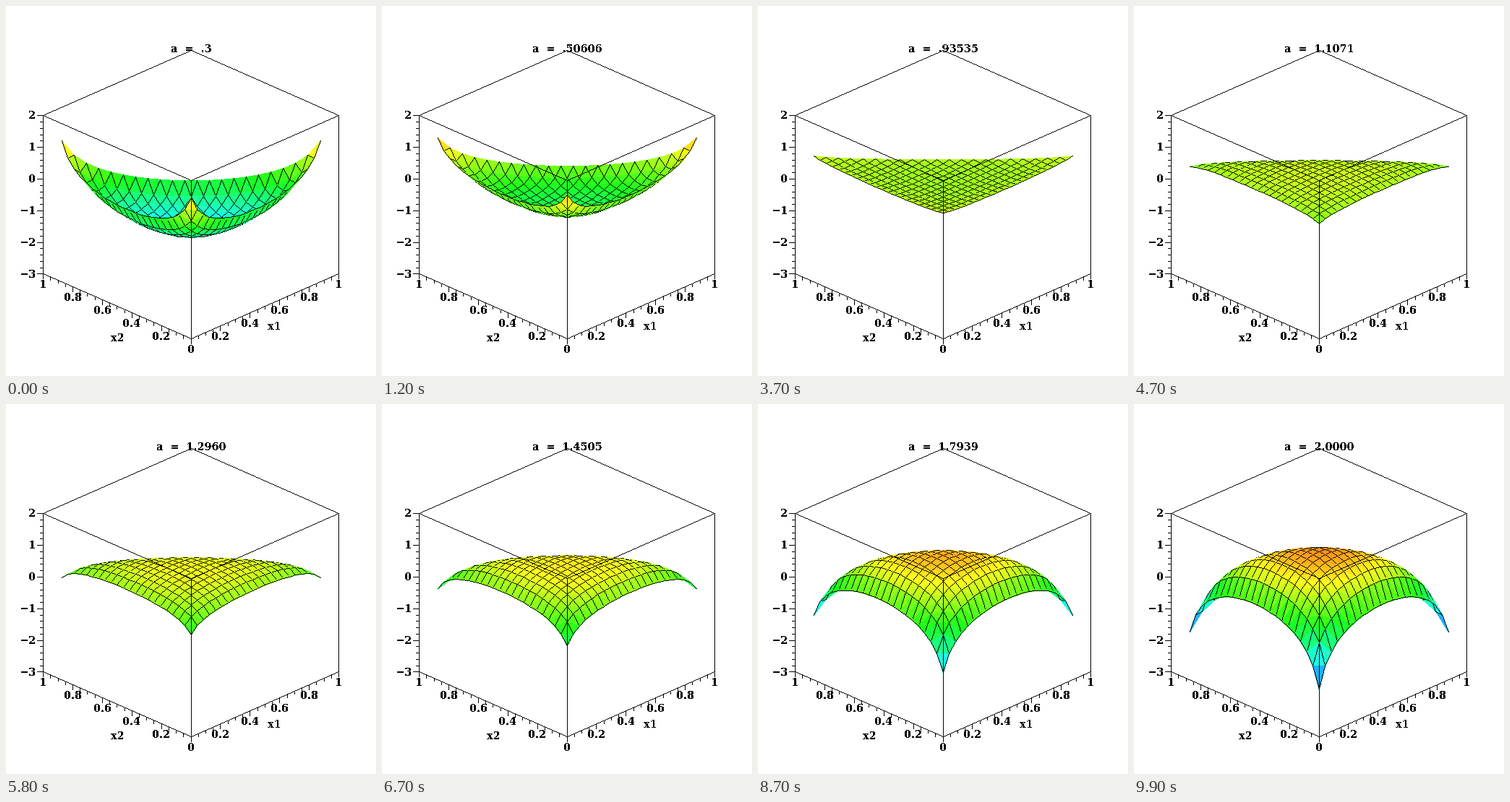
Recreate the animation shown at these times as a matplotlib script. Size 512 px wide and 512 px high, loop 10 s.

```python
import math
from colorsys import hsv_to_rgb

import matplotlib.pyplot as plt
import numpy as np
from matplotlib.animation import FuncAnimation
from matplotlib.collections import PathCollection
from matplotlib.path import Path

SIZE, DPI = 512, 64
PX = 72 / DPI  # points per pixel
FRAMES, STEP_MS = 100, 100
A_MIN, A_MAX = 0.3, 2.0
Z_MIN, Z_MAX = -3, 2
N = 24  # grid cells per unit
HUE_STEP = 62 / 360  # hue change per unit of z
FONT = dict(family="DejaVu Serif", weight="bold", size=14.5 * PX,
            color="black", va="baseline")
DOT = np.array([(-0.3, -0.3), (0.3, -0.3), (0, 0.3), (-0.3, -0.3)])
DOT_CODES = [Path.MOVETO, Path.LINETO, Path.LINETO, Path.CLOSEPOLY]

plt.rcParams["text.antialiased"] = False


def project(x1, x2, z):
    """Orthographic view of the box in pixels, y pointing down."""
    return (255.6 + 204.5 * (x1 - x2),
            460.4 - 90 * (x1 + x2) - 43.8 * (z - Z_MIN))


def pixel_line(*points):
    """Polyline one pixel wide, as a path that touches only its own pixels."""
    points = np.rint(points)
    spans = []
    for p, q in zip(points, points[1:]):
        steps = int(abs(q - p).max())
        spans.append(np.rint(np.linspace(p, q, steps + 1)))
    dots = np.concatenate(spans)
    verts = (dots[:, None] + DOT).reshape(-1, 2)
    return Path(verts, DOT_CODES * len(dots))


def log_density(a, x1, x2):
    """Log density of the symmetric Dirichlet(a, a, a) distribution."""
    norm = math.lgamma(3 * a) - 3 * math.lgamma(a)
    return norm + (a - 1) * np.log(x1 * x2 * (1 - x1 - x2))


def build_mesh():
    """Triangles (side, apex, side) in grid indices, far to near."""
    tris = []
    for s in range(N - 2, 1, -1):
        cells = [(i, s - i) for i in range(1, s)]
        if s + 2 < N:
            tris += [((i + 1, j), (i + 1, j + 1), (i, j + 1))
                     for i, j in cells]
        tris += [((i + 1, j), (i, j), (i, j + 1)) for i, j in cells]
    return np.array(tris)


MESH = build_mesh() / N
X1, X2 = MESH[..., 0], MESH[..., 1]


def surface(a):
    z = log_density(a, X1, X2)
    points = np.stack(project(X1, X2, z), axis=-1)
    paths, colors = [], []
    for tri, height in zip(points, z.mean(axis=1)):
        paths += [Path(np.vstack([tri, tri[:1]])), pixel_line(*tri)]
        colors += [hsv_to_rgb((Z_MAX - height) * HUE_STEP, 0.9, 1), (0, 0, 0)]
    return paths, colors


def title_text(a):
    if a == A_MIN:
        value = ".3"
    else:
        value = f"{a:.5f}".lstrip("0") if a < 1 else f"{a:.4f}"
    return "a  =  " + value


def label(x, y, text, ha="center"):
    return ax.text(x, y, text, ha=ha, **FONT)


def add_shapes(paths, **kwargs):
    shapes = PathCollection(paths, linewidths=0, antialiaseds=False,
                            snap=False, **kwargs)
    ax.add_collection(shapes)
    return shapes


def draw_box():
    lo, hi = Z_MIN, Z_MAX
    ring = [(0, 0), (1, 0), (1, 1), (0, 1), (0, 0)]
    lines = [pixel_line(project(x, y, lo), project(x, y, hi))
             for x, y in ((0, 0), (1, 0), (0, 1))]
    lines.append(pixel_line(*(project(*p, hi) for p in ring)))
    lines.append(pixel_line(project(1, 0, lo), project(0, 0, lo),
                            project(0, 1, lo)))

    for k in range(5 * (hi - lo) + 1):
        x, y = project(0, 1, lo + k / 5)
        lines.append(pixel_line((x, y), (x - (4 if k % 5 else 8), y)))
        if k % 5 == 0:
            text = str(lo + k // 5).replace("-", "\u2212")
            label(41, y + 4.6, text, "right")

    for k in range(21):
        t = k / 20
        for side, p in enumerate(((t, 0), (0, t))):
            x, y = project(*p, lo)
            lines.append(pixel_line((x, y), (x, y + (4 if k % 4 else 7))))
            if k % 4 == 0 and (k or side == 0):
                label(x, y + 19.4, f"{t:g}")

    label(371, 448, "x1")
    label(153.5, 463, "x2")
    add_shapes(lines, facecolors="black", zorder=3)


fig = plt.figure(figsize=(SIZE / DPI, SIZE / DPI), dpi=DPI, facecolor="white")
ax = fig.add_axes([0, 0, 1, 1])
ax.set_xlim(-0.5, SIZE - 0.5)
ax.set_ylim(SIZE - 0.5, -0.5)
ax.axis("off")

sheet = add_shapes([], zorder=2)
draw_box()
title = label(256, 63, "")


def update(frame):
    a = A_MIN + (A_MAX - A_MIN) * frame / (FRAMES - 1)
    paths, colors = surface(a)
    sheet.set_paths(paths)
    sheet.set_facecolor(colors)
    title.set_text(title_text(a))
    return sheet, title


anim = FuncAnimation(fig, update, frames=FRAMES, interval=STEP_MS,
                     repeat=True, repeat_delay=0, blit=False)
plt.show()
```
